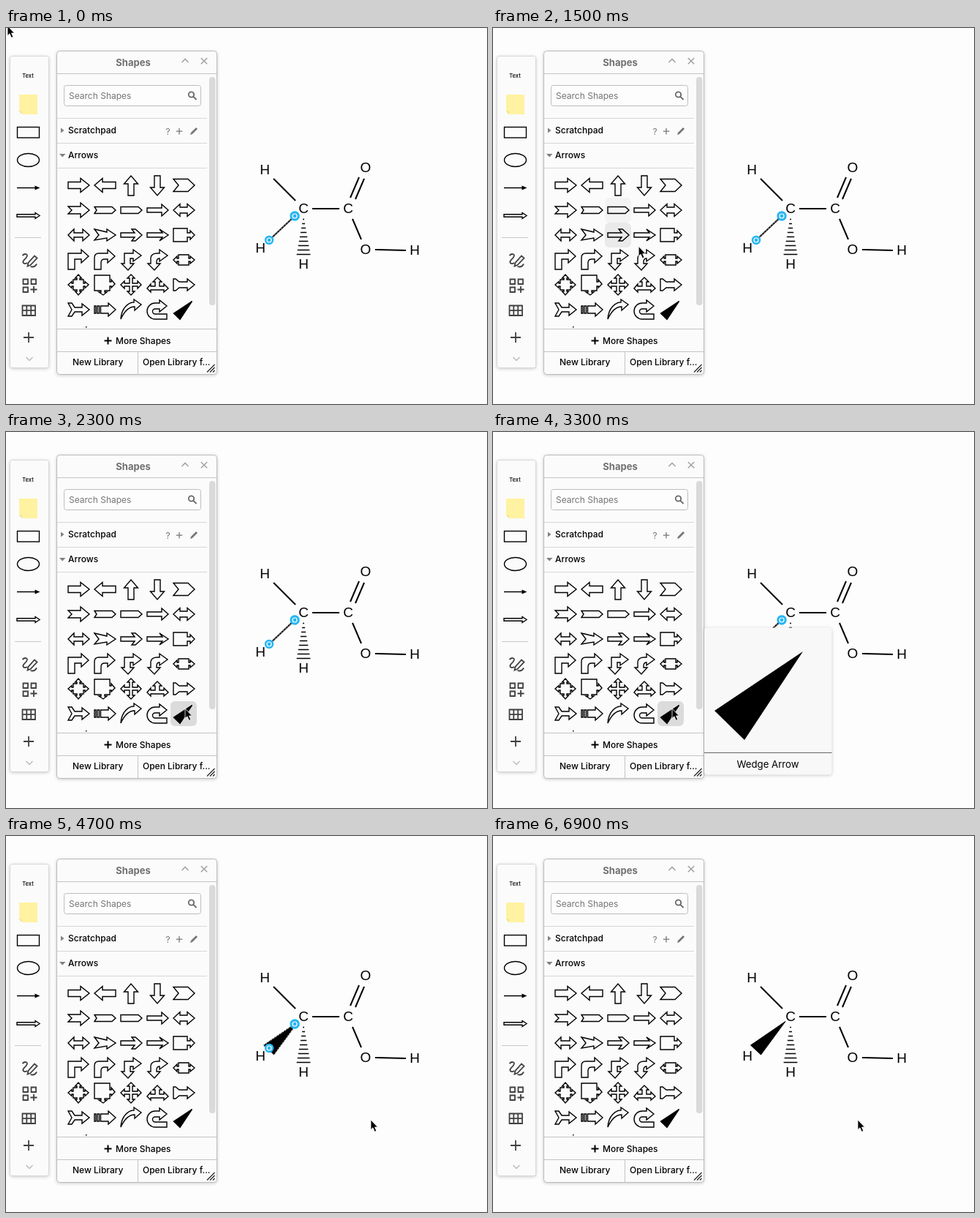
Recreate the animation shown at these times as an HTML page. Size 658x514 px, loop 7.1 s.

```html
<!DOCTYPE html>
<html lang="en">
<head>
<meta charset="utf-8">
<title>Wedge bond</title>
<style>
  html, body { margin: 0; width: 100%; height: 100%; overflow: hidden; background: #fdfdfd; }
  svg { display: block; width: 658px; height: 514px; }
  text { font: 500 12px Inter, sans-serif; }
  .atoms text { font: 19px "Liberation Sans", Arial, sans-serif; text-anchor: middle; }
  .line { fill: none; stroke: #000; stroke-width: 1.4; }
  .rule { fill: none; stroke: #d6d6d6; }
  .tool { fill: none; stroke: #404040; stroke-width: 1.8; }
  .bond { fill: none; stroke: #000; stroke-width: 2; }
  .box { filter: drop-shadow(0 1px 2px #0003); }
</style>
</head>
<body>
<svg viewBox="0 0 658 514">
  <!-- toolbar -->
  <rect class="box" x="5.5" y="38.5" width="53" height="426" rx="3" fill="#fbfbfb" stroke="#d8d8d8"/>
  <text x="30" y="68" text-anchor="middle" style="font-size:7.5px">Text</text>
  <path d="M18 91H43V118H22L18 114Z" fill="#fff2a1"/>
  <path d="M18 114L22 113.5V118Z" fill="#efe3a0"/>
  <g class="line">
    <rect x="15.5" y="135.5" width="30" height="14.5"/>
    <ellipse cx="30.5" cy="180.5" rx="15" ry="9"/>
    <path d="M15 218.5H41M15 254.7H40V252.5L46 256.5 40 260.5V258.3H15Z"/>
  </g>
  <path d="M39.5 215.5L46.5 218.5 39.5 221.5Z"/>
  <path d="M12 286.5H48" stroke="#c8c8c8"/>
  <g class="tool">
    <path d="M22.5 311C26 307.5 31 309 28 313.5L24 318C22 321.5 25.5 323.5 29 321M29.5 325.5L30.5 321 39 311.5 42.5 314.5 33.5 324ZM33.5 326Q39 328 42 322.5"/>
    <path d="M23.5 343.5h6.5v6.5h-6.5zM34.5 343.5h6.5v6.5h-6.5zM23.5 354.5h6.5v6.5h-6.5zM38 353v9M33.5 357.5h9"/>
    <path d="M22.5 379.5h17.5v13.5h-17.5zM22.5 386.2h17.5M28.3 379.5v13.5M34.2 379.5v13.5"/>
    <path d="M31 416v14M24 423h14"/>
  </g>
  <path d="M27.5 450L32 454.5 36.5 450" fill="none" stroke="#bbb" stroke-width="1.5"/>

  <!-- shapes panel -->
  <rect class="box" x="69.5" y="31.5" width="219" height="442" rx="4" fill="#fbfbfb" stroke="#bcbcbc"/>
  <text x="174" y="52.4" text-anchor="middle" fill="#707070" style="font-size:13px;font-weight:700">Shapes</text>
  <path d="M240.5 47L245 42.5 249.5 47M266.8 41L275.2 49.2M275.2 41L266.8 49.2" fill="none" stroke="#a4a4a4" stroke-width="1.6"/>
  <rect x="79.5" y="78.5" width="187" height="28" rx="3" fill="#fdfdfd" stroke="#bdbdbd"/>
  <text x="86" y="97" fill="#757575" style="font-weight:400">Search Shapes</text>
  <g fill="none" stroke="#686868" stroke-width="1.8"><circle cx="253.5" cy="91" r="3.7"/><path d="M256.3 93.8L260.5 98"/></g>
  <path class="rule" d="M70 123.5H275M70 157.5H275M70 191.5H275"/>
  <path class="rule" style="stroke:#c4c4c4" d="M70 62.5H288M70 411.5H288M70 442.5H288M180.5 442.5V473"/>
  <rect x="278" y="67" width="8.5" height="312" rx="4" fill="#dadada"/>
  <path d="M75 136.5L79.5 140 75 143.5ZM73 172H81.5L77.2 176.5Z" fill="#808080"/>
  <text x="85" y="144">Scratchpad</text>
  <text x="85" y="178">Arrows</text>
  <text x="218.5" y="145.5" fill="#777" style="font-weight:400">?</text>
  <path d="M237 137v8.5M232.8 141.2h8.5" stroke="#777" stroke-width="1.3"/>
  <path d="M252 146L253 143 260 136 262 138 255 145Z" fill="#777"/>
  <g id="hovers"></g>
  <g id="icons" class="line"></g>
  <rect x="109" y="408" width="1.5" height="1.5"/>
  <path d="M139.5 422.5v10M134.500 427.500h10" stroke="#000" stroke-width="2"/>
  <text x="150" y="432">More Shapes</text>
  <text x="91" y="461">New Library</text>
  <text x="187" y="461">Open Library f...</text>
  <path d="M275 470.5L285.5 460M279 470.5L285.5 464M283 470.5L285.5 468" stroke="#222" stroke-width="1.2"/>

  <!-- molecule -->
  <g class="atoms" id="atoms"></g>
  <path class="bond" d="M366 206L396 236M419 247H456M471 232L483 204M478 234L490 206M474 261L486 289M505 303L547 304"/>
  <path class="bond" id="hash" style="stroke-width:1.6"/>
  <path class="bond" id="plainBond" d="M395 257L360 290"/>
  <path id="wedgeBond" stroke="#000" stroke-linejoin="round"/>
  <g id="selection">
    <path id="outline" fill="none" stroke="#ccc" stroke-dasharray="2 2"/>
    <g fill="#29b6f2"><circle cx="395" cy="257" r="6.7"/><circle cx="360" cy="290" r="6.2"/></g>
    <g fill="none" stroke="#fff" stroke-width="1.2"><circle cx="395" cy="257" r="3"/><circle cx="360" cy="290" r="3"/></g>
  </g>

  <g id="preview">
    <rect class="box" x="289" y="267.5" width="174.5" height="201" rx="4" fill="#f8f8f8"/>
    <path d="M424 300L303 381 344 421Z"/>
    <path d="M289 438.5H463.5" stroke="#666"/>
    <text x="376" y="459" text-anchor="middle" style="font-size:13.2px;font-weight:400">Wedge Arrow</text>
  </g>
  <path id="cursor" d="M0 0V13.5L3 10.8 5.3 16.2 7.8 15.2 5.5 10H9.5Z" stroke="#fff" stroke-width=".8"/>
</svg>
<script>
const LOOP = 7100, STEP = 100;
const PREVIEW_ON = 2400, APPLY = 3400, DESELECT = 4800;
const BOND = "M395 257L360 290", WEDGE = "M400 253.500L352.500 286 366.500 299Z";
const $ = id => document.getElementById(id);
const clamp = v => Math.max(0, Math.min(1, v));
const cellX = col => 99 + 36 * col;
const cellY = row => 215 + 34 * row;

// Icon outlines around each cell's centre, five per row.
const icons = [
  "M-14-4.5H3V-9.5L15 0 3 9.5V4.5H-14Z",
  "M15-4.5H-3V-9.5L-14 0-3 9.5V4.5H15Z",
  "M-4 14V-2H-9.5L0-13 9.5-2H4V14Z",
  "M-4-13V3H-9.5L0 14 9.5 3H4V-13Z",
  "M-14-8.5H6L15 0 6 8.5H-14L-7 0Z",

  "M-14-5H3V-10L15 0 3 10V5H-14L-9 0Z",
  "M-14-4.5H10L15 0 10 4.5H-14L-11 0Z",
  "M-14-4.5H10L15 0 10 4.5H-14Z",
  "M-14-3H6V-8L15 0 6 8V3H-14Z",
  "M-14 0L-5-8.5V-4H5V-8.5L15 0 5 8.5V4H-5V8.5Z",

  "M-14 0L-6-8V-3H6V-8L15 0 6 8V3H-6V8Z",
  "M-14-8L3-4V-8L15 0 3 8V4L-14 7-8 0Z",
  "M-14-3H5L1-8H6L15 0 6 8H1L5 3H-14Z",
  "M-14-3H7L3-8 15 0 3 8 7 3H-14Z",
  "M-14-9H5V-3H9V-6L15 0 9 6V3H5V9H-14Z",

  "M-14 13V-9H4V-14L14-5 4 4V-1H-5V13Z",
  "M-14 13V-3Q-14-9-8-9H4V-14L14-5 4 4V-1H0Q-5-1-5 4V13Z",
  "M-9-9H3V-14L14-6 3 2V-2H-1V5H4L-4 14-13 5H-9Z",
  "M-9 5V-3Q-8-9 0-9H3V-14L14-6 3 2V-2Q-1-2-1 3V5H4L-4 14-13 5Z",
  "M-14 0L-9-5V-2H-7V-7H7V-2H9V-5L15 0 9 5V2H7V7H-7V2H-9V5Z",

  "M-7-7H-2V-9H-4.5L0-14 4.5-9H2V-7H7V-2H9V-4.5L14 0 9 4.5V2H7V7H2V9H4.5L0 14-4.5 9H-2V7H-7V2H-9V4.5L-14 0-9-4.5V-2H-7Z",
  "M-14-13H7V-4H9V-7L14-1 9 4V2H7V8H0V10H3L-2 14-8 10H-5V8H-14Z",
  "M0-14L5-9H2V-2H9V-5L14 0 9 5V2H2V9H5L0 14-5 9H-2V2H-9V5L-14 0-9-5V-2H-2V-9H-5Z",
  "M0-10L6-4H3V2H9V-1L15 5 9 10V7H-9V10L-14 5-9-1V2H-3V-4H-6Z",
  "M-14-8H-11L-6-4H5V-8L15 0 5 8V4H-6L-11 8H-14Z",

  "M-14-9H-9L-5-3H5V-8L15 0 5 8V3H-5L-9 9H-14L-9 0Z",
  "M-14-5h2v10h-2zM-10-5h2.5v10h-2.5zM-5.5-5H5V-9L15 0 5 9V5H-5.5Z",
  "M-14 13C-13-3-3-10 4-10V-14L14-7 5 1V-4C-2-4-9 2-14 13Z",
  "M13 13H-3A11 11 0 0 1-3-9H3V-13L13-5 3 3V-1H-3A3.5 3.5 0 0 0-3 6H13Z",
  "M11.5-11.5L-13.5 5.2-5 13.500Z"
];
$("icons").innerHTML = icons.map((d, i) =>
  `<path d="${d}" transform="translate(${cellX(i % 5)} ${cellY(i / 5 | 0)})"${i === icons.length - 1 ? ' fill="#000"' : ""}/>`
).join("");

const atoms = [["H", 354, 194], ["O", 492, 191], ["C", 407, 247], ["C", 468, 247],
  ["H", 348, 301], ["H", 407, 323], ["O", 492, 303], ["H", 559, 304]];
$("atoms").innerHTML = atoms.map(([s, x, y]) => `<text x="${x}" y="${y + 6.4}">${s}</text>`).join("");

$("hash").setAttribute("d", Array.from({ length: 9 }, (_, i) => {
  const half = 1 + i * 1.05;
  return `M${407 - half} ${261.5 + i * 6}h${2 * half}`;
}).join(""));
$("wedgeBond").setAttribute("d", WEDGE);

// Column, row, time entered, time left.
const hovers = [[2, 1, 1300, 1400], [2, 2, 1400, 1500], [3, 3, 1600, 1900], [3, 4, 1900, 2100], [4, 5, 2100, 4000]];
$("hovers").innerHTML = hovers.map(([c, r]) =>
  `<rect x="${cellX(c) - 18}" y="${cellY(r) - 17}" width="36" height="34" rx="6"/>`).join("");
const hoverLevel = (t, enter, leave) =>
  0.13 * clamp((Math.min(t, leave) - enter) / 200) * clamp(1 - (t - leave) / 200);

const smooth = u => u * u * (3 - 2 * u);
const moves = [
  { start: 800, end: 1600, from: [2, -3], to: [208, 312], ease: smooth },
  { start: 1600, end: 2300, from: [208, 312], to: [245, 378], ease: smooth },
  { start: 3900, end: 4700, from: [245, 378], to: [499, 388], ease: u => 1 - (1 - u) ** 1.12 }
];
function cursorAt(t) {
  const move = moves.findLast(m => t >= m.start) || moves[0];
  const u = move.ease(clamp((t - move.start) / (move.end - move.start)));
  return move.from.map((a, i) => a + (move.to[i] - a) * u);
}

const show = (id, on) => $(id).setAttribute("visibility", on ? "visible" : "hidden");

function draw(now) {
  const t = Math.floor((now % LOOP) / STEP) * STEP;
  const applied = t >= APPLY;
  $("cursor").setAttribute("transform", `translate(${cursorAt(t)})`);
  hovers.forEach(([, , enter, leave], i) =>
    $("hovers").children[i].setAttribute("opacity", hoverLevel(t, enter, leave)));
  show("preview", t >= PREVIEW_ON && !applied);
  show("plainBond", !applied);
  show("wedgeBond", applied);
  show("selection", t < DESELECT);
  $("outline").setAttribute("d", applied ? WEDGE : BOND);
  requestAnimationFrame(draw);
}
draw(performance.now());
</script>
</body>
</html>
```
